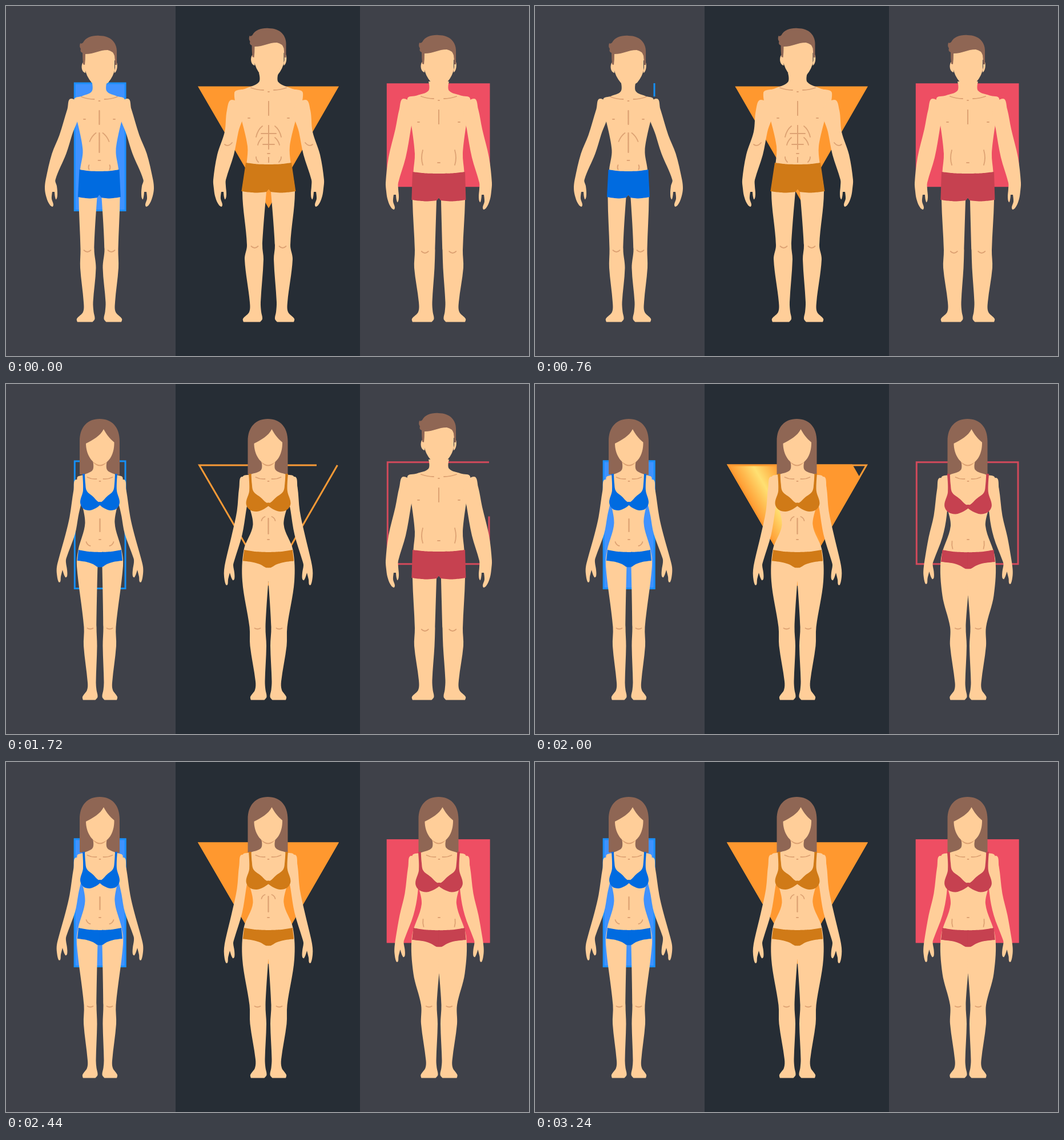
An HTML page with a canvas for the animation above (3.28 s loop, 916x612 px).

```html
<!DOCTYPE html>
<html lang="en">
<head>
<meta charset="utf-8">
<title>Body types</title>
<style>
html, body { margin: 0; width: 100%; height: 100%; overflow: hidden; background: #3f4149; }
canvas { display: block; }
</style>
</head>
<body>
<canvas id="stage" width="916" height="612"></canvas>
<script>
const ctx = document.getElementById('stage').getContext('2d');
const LOOP = 3280, SKIN = '#ffce99', MARK = '#dda273', HAIR = '#8f6654';

// "x,y" points; "!" marks a sharp corner.
const points = (text, dx = 0, dy = 0) => text.split(' ').map(s => {
  const [x, y] = s.split(',').map(parseFloat);
  return [x + dx, y + dy, s.endsWith('!')];
});

// Closed smooth curve through [x, y, sharp] points.
function contour(pts) {
  const n = pts.length, path = new Path2D();
  const handle = (i, len) => {
    const [x, y, sharp] = pts[i], a = pts[(i + n - 1) % n], b = pts[(i + 1) % n];
    const dx = b[0] - a[0], dy = b[1] - a[1];
    const k = sharp ? 0 : len / (Math.hypot(dx, dy) || 1);
    return [x + dx * k, y + dy * k];
  };
  path.moveTo(pts[0][0], pts[0][1]);
  for (let i = 0; i < n; i++) {
    const j = (i + 1) % n, [x, y] = pts[j];
    const len = Math.hypot(x - pts[i][0], y - pts[i][1]) / 3;
    path.bezierCurveTo(...handle(i, len), ...handle(j, -len), x, y);
  }
  path.closePath();
  return path;
}

const hands = {
  man: '10,15 8,28 3,41 -3,47 -5,43 -2,33 -3,21! -7,21! -8,30 -10,34 -12,25 -11,11',
  woman: '10,15 10,27 7,41 4,41 3,32 0,20! -5,33 -8,31 -8,20 -6,7'
};
const bra = contour(points('-1,206! 3,206 12,197 23,187 25.5,174 26.5,157! 30.5,157! 29.5,186 34.5,207 29,218 18,221 7,217 -1,211!'));
const briefs = contour(points('-1,294! 20,293 37.5,290! 39.5,309! 24,311 12,315 4,320 -1,320!'));

const maleHead = {
  face: new Path2D('M138 70V108Q140 122 150 134Q157 139 164.5 139Q172 139 179 134Q189 122 191 108V70ZM139 97C131 96 130 115 139 117ZM190 95C197 95 196 115 190 117Z'),
  hair: new Path2D('M139 84Q139 95 138 103L135 102Q134 92 134 82Q129 80 131 75Q128 71 130 65Q132 67 135 64C140 54 153 51 164 52C183 52 196 64 194 84V103H191Q191 94 190 87Q188 79 178 77C163 77 155 84 139 84Z')
};
const femaleHead = {
  face: new Path2D('M171 79C165 91 152 98 140 104C140 124 152 141 164.5 141C178 141 190 125 189.5 102C181 95 176 88 171 79Z'),
  hair: new Path2D('M129 158V100C129 75 143 61 164 61C186 61 199 76 199 100V159Q188 160 178 152H151Q142 160 129 158Z'),
  chin: new Path2D('M153 136Q164.5 149 176 136')
};

// Figures are mirrored about x = c. Torso keys are [offset, y];
// arm and leg keys run downwards as [outer, inner, y].
const men = [
  { c: 163.5, head: [0, 0], neck: [13, 149], shoulder: [44, 163], armpit: [38.5, 203], waist: [29, 252], hip: [33.5, 286],
    arm: [[56, 34, 180], [70, 48, 226], [83, 58, 258], [94, 77, 304]],
    leg: [[36, 4, 335], [33, 9, 425], [33.5, 6, 458], [27.5, 11, 518]],
    marks: 'M17 237Q13 227 6 222M0 222V256M18 278Q20 282 18 286' },
  { c: 460, head: [296.5, -13], neck: [17, 133], shoulder: [60, 152], armpit: [47, 201], waist: [37, 245], hip: [38.5, 274],
    arm: [[73, 44, 182], [77, 53, 220], [90, 61, 260], [97, 75, 304]],
    leg: [[46, 4, 325], [38, 11, 418], [42, 9, 443], [33, 14, 518]],
    marks: 'M22 229Q19 216 11 210M19 243Q17 235 11 230M0 209V250M-1 223H13M-1 242H10M0 265V273M22 264Q22 269 18 273M77 242Q71 247 64 239' },
  { c: 758, head: [594, -1], neck: [18, 148], shoulder: [55, 162], armpit: [48, 208], waist: [42, 258], hip: [44.5, 290],
    arm: [[69, 44, 180], [76, 49, 215], [88, 58, 265], [93, 71, 309]],
    leg: [[46, 4, 340], [42, 6.5, 427], [43, 7.5, 458], [35, 11.5, 518]],
    marks: 'M28 252Q32 266 28 278' }
];
const women = [
  { c: 164.5, head: [0, 0], fit: [1, 1], neck: [12.5, 150], shoulder: [40, 164], armpit: [33.5, 203], waist: [26, 243], hip: [38, 290],
    arm: [[46, 30, 185], [53, 38, 232], [60, 43.5, 262], [72, 59, 305]],
    leg: [[40.5, 4, 318], [28, 6, 425], [28.5, 5, 458], [21.5, 7, 522]],
    marks: 'M0 236V258M24 276Q22 282 17 283' },
  { c: 459.5, head: [294.5, 0], fit: [1.13, 1.03], neck: [12.5, 150], shoulder: [45, 163], armpit: [36, 208], waist: [27, 246], hip: [43, 290],
    arm: [[51, 33, 180], [55, 39, 222], [64, 46, 264], [75, 60, 310]],
    leg: [[45.5, 0, 345], [33, 5, 425], [32, 3.5, 458], [22.5, 6, 520]],
    marks: 'M12 239Q11 234 6 232M0 235V262' },
  { c: 758.5, head: [593.5, 0], fit: [1.2, 1.1], neck: [12.5, 150], shoulder: [47, 164], armpit: [38, 214], waist: [30.5, 248], hip: [47.5, 305],
    arm: [[54, 36, 182], [60, 37.5, 230], [69, 45, 268], [76, 60, 308]],
    leg: [[45, 0, 370], [31.5, 4, 425], [31.5, 2.5, 458], [23, 5, 522]],
    marks: 'M28 275Q29 282 27 288' }
];

function armPath({ arm }, hand) {
  const [out, inn, y] = arm[0], wrist = arm[3];
  return contour([
    [inn + 0.7 * (out - inn), y - 18],
    ...arm.map(([o, , v]) => [o, v]),
    ...points(hand, (wrist[0] + wrist[1]) / 2, wrist[2]),
    ...arm.map(([, i, v]) => [i, v]).reverse()
  ]);
}

function trunkPath({ neck, shoulder, armpit, waist, hip, leg }, spread) {
  const [nx, ny] = neck, [sx, sy] = shoulder, [out, inn] = leg[3];
  const [, gap, crotch] = leg[0];
  return contour([
    [-1, ny - 16, true], [nx, ny - 16, true], neck,
    [nx + 0.55 * (sx - nx), ny + 0.6 * (sy - ny)], shoulder,
    [...armpit, true], waist, hip,
    ...leg.map(([o, , y]) => [o, y]),
    [out + 1, 535], [out + spread, 547], [out + spread - 1, 552.5, true],
    [inn + 1, 552.5, true], [inn - 3, 547], [inn - 1, 535],
    ...leg.slice(1).reverse().map(([, i, y]) => [i, y]),
    [gap, crotch, true], [-1, crotch - gap * 1.5, true]
  ]);
}

function shortsPath({ hip: [w, top], leg: [[out, gap, hem]] }) {
  return contour([
    [-1, top + 3, true], [w * 0.5, top + 2.5], [w + 1.5, top, true],
    [out + 1.5, hem - 1, true], [out * 0.5, hem + 1.5], [gap - 0.5, hem, true], [-1, hem - 6, true]
  ]);
}

function kneeMark({ leg: [, [out, inn, y]] }, w, depth) {
  const x = (out + inn) / 2;
  return `M${x - w} ${y + 2}Q${x} ${y + 2 + depth} ${x + w} ${y + 2}`;
}

for (const f of men) {
  const y = f.neck[1], [ax, ay] = f.armpit;
  f.parts = [trunkPath(f, 12), armPath(f, hands.man)];
  f.shorts = shortsPath(f);
  f.marks = new Path2D(f.marks + kneeMark(f, 6, 6)
    + `M31 ${y + 10}Q20 ${y + 14} 9 ${y + 14}M0 ${y + 17}h1M0 ${y + 34}V${y + 58}`
    + `M${ax - 14} ${ay - 5}h3M0 ${f.hip[1] - 16}h2`);
}
for (const f of women) {
  f.parts = [trunkPath(f, 9), armPath(f, hands.woman)];
  f.marks = new Path2D(f.marks + kneeMark(f, 5, 3) + 'M22 163Q14 167 6 166M0 170h1M0 272h1.5');
}

// Outline corners in drawing order, slant of the wipe, and [start, end] times of each phase.
const panels = [
  { pts: [[209, 135], [209, 357.5], [120.3, 357.5], [120.3, 135]], slant: 0,
    fill: '#4092ff', rim: '#1b8efb', line: '#158ff5', shine: '#66aaff', cloth: '#006be0',
    out: [420, 700], draw: [640, 1680], swap: 1440, into: [1720, 1960] },
  { pts: [[580.4, 142], [460, 350.5], [338.6, 142]], slant: 0.577,
    fill: '#ff982f', rim: '#ff982f', line: '#f89a36', shine: '#ffe072', cloth: '#d07a17',
    out: [715, 1015], draw: [900, 1850], swap: 1600, into: [1810, 2050] },
  { pts: [[846, 136.8], [668.3, 136.8], [668.3, 314.7], [846, 314.7]], slant: 0,
    fill: '#ee4e63', rim: '#ee4e63', line: '#d1495b', shine: '#ff8292', cloth: '#c64150',
    out: [780, 1020], draw: [851, 1979], swap: 1860, into: [2040, 2300] }
];
for (const p of panels) {
  const xs = p.pts.map(q => q[0]);
  p.left = Math.min(...xs) - 3;
  p.right = Math.max(...xs) + 3;
  p.top = p.pts[0][1];
  p.path = new Path2D('M' + p.pts.join('L') + 'Z');
  p.length = p.pts.reduce((sum, [x, y], i) => {
    const [u, v] = p.pts[(i + 1) % p.pts.length];
    return sum + Math.hypot(u - x, v - y);
  }, 0);
}

const linear = (t, [a, b]) => Math.min(1, Math.max(0, (t - a) / (b - a)));
const ease = (t, span) => { const u = linear(t, span); return u * u * (3 - 2 * u); };

function paint(path, color) {
  ctx.fillStyle = color;
  ctx.fill(path);
}

function stroke(path, color, width) {
  ctx.strokeStyle = color;
  ctx.lineWidth = width;
  ctx.stroke(path);
}

function mirrored(c, draw) {
  for (const side of [-1, 1]) {
    ctx.save();
    ctx.translate(c, 0);
    ctx.scale(side, 1);
    draw();
    ctx.restore();
  }
}

function atHead(f, draw) {
  ctx.save();
  ctx.translate(...f.head);
  draw();
  ctx.restore();
}

// Filled shape between two positions of the slanted wipe edge.
function fillShape(p, from, to, style) {
  const at = (x, y) => [x + p.slant * (y - p.top), y];
  ctx.save();
  ctx.beginPath();
  ctx.moveTo(...at(from, 0));
  ctx.lineTo(...at(to, 0));
  ctx.lineTo(...at(to, 612));
  ctx.lineTo(...at(from, 612));
  ctx.clip();
  paint(p.path, style);
  stroke(p.path, p.rim, 3);
  ctx.restore();
}

function shineStyle(p, t) {
  const start = p.into[0] + 95, wide = p.right - p.left;
  const u = linear(t, [start, start + wide + 100]);
  if (u === 0 || u === 1) return p.fill;
  const x = p.left - 50 + u * (wide + 100);
  const dx = 45 / (1 + p.slant ** 2), dy = -p.slant * dx;
  const g = ctx.createLinearGradient(x - dx, p.top - dy, x + dx, p.top + dy);
  g.addColorStop(0, p.fill);
  g.addColorStop(0.5, p.shine);
  g.addColorStop(1, p.fill);
  return g;
}

function drawShape(p, t) {
  const wide = p.right - p.left;
  const gone = ease(t, p.out), drawn = ease(t, p.draw), filled = ease(t, p.into);
  if (gone < 1) fillShape(p, p.left + gone * wide, p.right + 1, p.fill);
  if (drawn > 0) {
    ctx.setLineDash(drawn < 1 ? [drawn * p.length, p.length] : []);
    stroke(p.path, p.line, 3);
    ctx.setLineDash([]);
  }
  if (filled > 0) fillShape(p, p.left - 1, p.left + filled * wide, shineStyle(p, t));
}

function drawBody(f) {
  mirrored(f.c, () => f.parts.forEach(part => paint(part, SKIN)));
  ctx.lineCap = 'round';
  mirrored(f.c, () => stroke(f.marks, MARK, 1.8));
  ctx.lineCap = 'butt';
}

function drawMan(f, cloth) {
  drawBody(f);
  mirrored(f.c, () => paint(f.shorts, cloth));
  atHead(f, () => {
    paint(maleHead.face, SKIN);
    paint(maleHead.hair, HAIR);
  });
}

function drawWoman(f, cloth) {
  atHead(f, () => paint(femaleHead.hair, HAIR));
  drawBody(f);
  atHead(f, () => {
    stroke(femaleHead.chin, MARK, 2);
    paint(femaleHead.face, SKIN);
  });
  for (const [path, y] of [[bra, 157], [briefs, 290]]) {
    mirrored(f.c, () => {
      ctx.translate(0, y);
      ctx.scale(...f.fit);
      ctx.translate(0, -y);
      paint(path, cloth);
    });
  }
}

function frame(now) {
  const t = now % LOOP;
  ctx.fillStyle = '#3f4149';
  ctx.fillRect(0, 0, 916, 612);
  ctx.fillStyle = '#262d35';
  ctx.fillRect(297, 0, 323, 612);
  panels.forEach((p, i) => {
    drawShape(p, t);
    if (t < p.swap) drawMan(men[i], p.cloth);
    else drawWoman(women[i], p.cloth);
  });
}

const begin = performance.now();
function tick() {
  frame(performance.now() - begin);
  requestAnimationFrame(tick);
}
tick();
</script>
</body>
</html>
```
